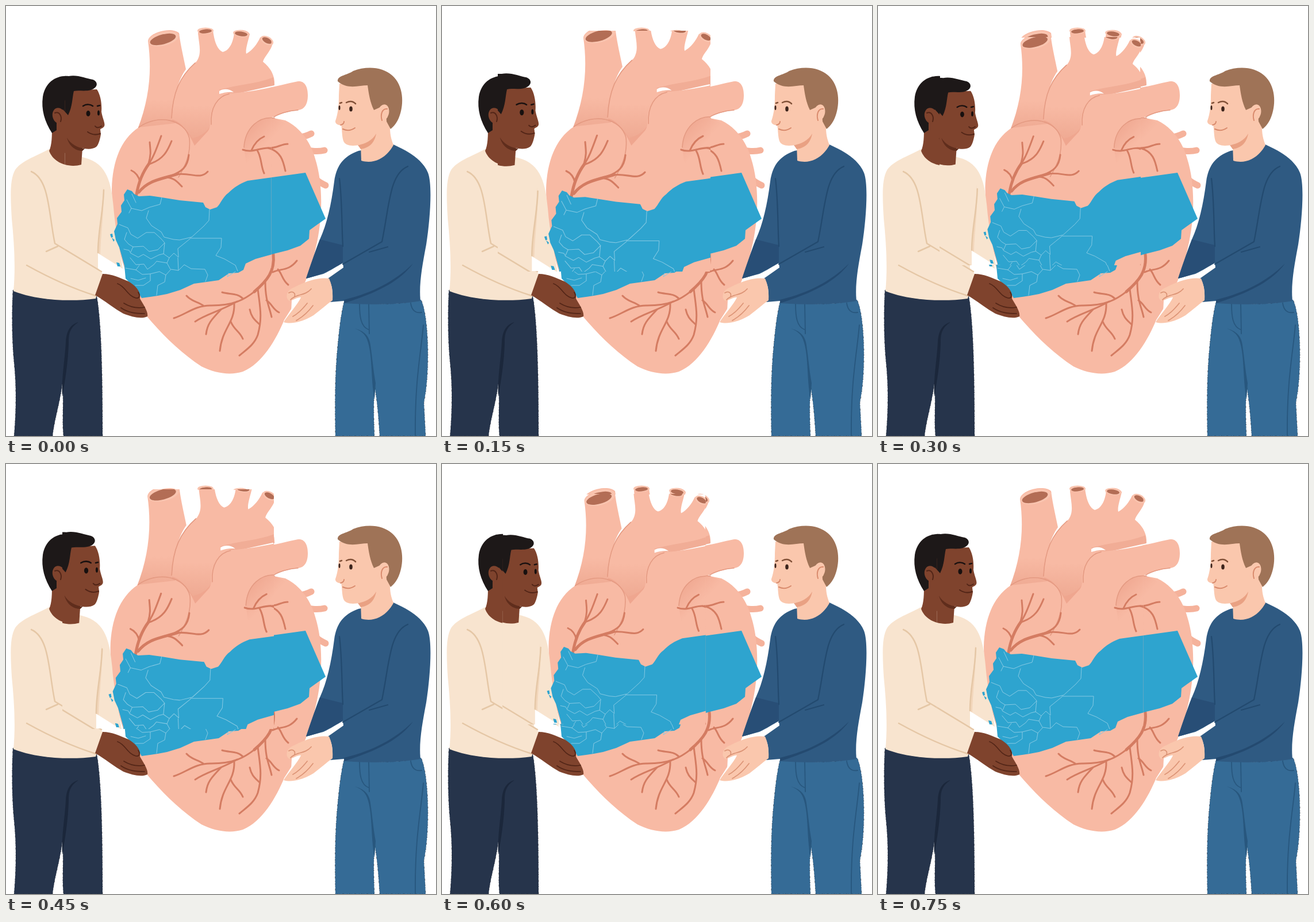
These frames come from a looping animation (748 px wide and 748 px high, 0.9 s). An HTML page:

```html
<!DOCTYPE html>
<html lang="en">
<head>
<meta charset="utf-8">
<title>Beating heart</title>
<style>
html, body { margin: 0; width: 100%; height: 100%; overflow: hidden; background: #fff; }
svg { display: block; width: 100%; height: 100%; }
.line { fill: none; stroke-linecap: round; stroke-linejoin: round; }
.vein { stroke: #d47c62; }
.border { stroke: #86c9e3; stroke-width: 1; }
.fringe { stroke: #1b1b22; stroke-width: 1; stroke-dasharray: 2 3 1 5 3 4 1 2; stroke-opacity: .55; }
</style>
</head>
<body>
<svg viewBox="0 0 748 748">
<defs>
  <clipPath id="win"><rect x="102.500" y="49" width="359" height="407"/></clipPath>
  <linearGradient id="down" x1="0" y1="0" x2="0" y2="1">
    <stop offset=".7" stop-color="#f8baa4"/><stop offset="1" stop-color="#efaa93"/>
  </linearGradient>
  <linearGradient id="lobe" x1="0" y1="0" x2="1" y2="1">
    <stop offset="0" stop-color="#eda28b"/><stop offset=".4" stop-color="#f8baa4"/>
  </linearGradient>
  <linearGradient id="trunk" x1="0" y1="0" x2="1" y2=".25">
    <stop offset="0" stop-color="#eea58e"/><stop offset=".25" stop-color="#f8baa4"/>
  </linearGradient>

  <g id="heart">
    <g class="line" stroke="#f5b29b" stroke-width="11">
      <path d="M496 229C510 230 521 227 531 222"/>
      <path d="M510 246C526 253 543 254 554 251"/>
      <path d="M530 292C540 304 548 308 556 312"/>
    </g>
    <path fill="url(#down)" d="M247 61C254 110 250 160 229 214L296 214C288 170 297 132 313 110C309 90 304 70 301 47C288 35 248 46 247 61Z"/>
    <path fill="#f8baa4" d="M231 211C199 232 185 272 184 318C185 385 200 470 246 541C274 574 305 604 340 627C364 639 390 643 412 636C446 622 470 580 484 546C508 510 530 468 539 420C551 370 552 310 538 266C530 236 511 211 486 199L440 190L330 200Z"/>
    <path fill="#efa68f" d="M289 192L358 158L362 206L328 243C318 220 307 206 289 202Z"/>
    <path fill="url(#down)" d="M288 197C290 150 302 122 331 97C342 82 335 65 334 46C338 38 355 36 360 42C362 60 367 76 377 80C391 77 396 58 397 46C402 40 420 40 424 49C421 62 416 76 418 83C428 78 437 66 442 55C449 50 463 56 464 65C460 80 449 88 447 97C461 108 468 122 467 137L395 153C372 162 357 180 357 206C350 220 336 228 324 230C312 212 302 200 288 197Z"/>
    <path fill="#f1ad96" d="M370 146C405 136 435 136 465 124L467 138L395 154Z"/>
    <path fill="#fff" d="M371 148C378 143 389 144 396 150C388 149 380 150 371 153Z"/>
    <path fill="url(#trunk)" d="M355 208C354 178 362 158 387 152C430 150 470 139 508 131C520 130 525 141 525 155C525 170 520 180 508 181C470 186 430 203 414 247L328 247C341 233 352 222 355 208Z"/>
    <path fill="url(#lobe)" d="M414 247C417 214 436 195 460 194C485 197 510 222 520 250L490 300L420 290Z"/>
    <g class="line" stroke="#e49a82" stroke-width="1.600">
      <path d="M231 211C265 187 311 197 319 230C322 260 310 281 300 298"/>
      <path d="M288 195C290 151 302 123 329 99"/>
      <path d="M357 206C355 177 368 157 388 153"/>
      <path d="M414 246C416 211 441 191 467 195"/>
      <path d="M508 181C490 182 474 188 466 193"/>
    </g>
    <g fill="#f9c4af">
      <ellipse cx="274" cy="57" rx="27" ry="12" transform="rotate(-13 274 57)"/>
      <ellipse cx="347" cy="43" rx="14" ry="5.500"/>
      <ellipse cx="409" cy="48" rx="14" ry="6" transform="rotate(8 409 48)"/>
      <ellipse cx="454" cy="60" rx="12" ry="7" transform="rotate(28 454 60)"/>
    </g>
    <g fill="#b36d55">
      <ellipse cx="273" cy="58" rx="23" ry="8.500" transform="rotate(-15 273 58)"/>
      <ellipse cx="347" cy="44" rx="11" ry="3.600" transform="rotate(-5 347 44)"/>
      <ellipse cx="409" cy="48.500" rx="11" ry="4" transform="rotate(8 409 48.500)"/>
      <ellipse cx="454" cy="60" rx="9" ry="4.500" transform="rotate(28 454 60)"/>
    </g>
    <g class="line vein">
      <g stroke-width="5">
        <path d="M227 328C231 304 240 286 249 274"/>
        <path d="M231 324C248 302 272 301 299 292"/>
        <path d="M465 432C468 461 455 477 432 497"/>
      </g>
      <g stroke-width="3">
        <path d="M245 280C256 265 262 248 270 226"/>
        <path d="M250 237C251 250 253 257 248 274"/>
        <path d="M249 275C274 267 281 252 288 235"/>
        <path d="M218 286C227 290 231 297 233 306"/>
        <path d="M288 295C305 288 316 281 318 259"/>
        <path d="M296 293C322 289 337 303 351 288"/>
        <path d="M277 298C292 298 298 306 306 314"/>
        <path d="M412 250C428 256 440 247 455 247C471 248 478 240 490 240"/>
        <path d="M427 251C432 239 440 231 449 227"/>
        <path d="M456 247C478 253 482 268 486 287"/>
        <path d="M437 251C445 264 443 278 449 291"/>
        <path d="M440 490C415 513 393 521 357 521C330 520 312 537 292 543"/>
        <path d="M343 521C334 514 324 515 314 504"/>
        <path d="M402 514C370 532 350 535 329 549"/>
        <path d="M374 528C357 546 350 553 348 571"/>
        <path d="M397 518C398 552 376 560 372 600"/>
        <path d="M391 549C397 564 406 565 412 579"/>
        <path d="M438 492C441 520 447 540 438 572C432 589 419 597 406 608"/>
        <path d="M440 553C433 546 427 542 424 528"/>
        <path d="M451 479C451 513 458 522 462 541"/>
        <path d="M453 512C463 518 464 528 475 533"/>
        <path d="M412 509C403 499 389 502 376 498"/>
        <path d="M464 463C478 456 491 462 506 443"/>
        <path d="M473 458C481 467 480 476 491 485"/>
      </g>
    </g>
  </g>

  <g id="map">
    <path fill="#2ea4cf" d="M211 319L219 322L223 327L231 331L250 330L271 333L302 338L343 342L347 350L355 354L367 350C374 343 377 332 387 325C397 315 407 309 420 304L456 299L521 290L556 370L539 382L528 390L527 405L512 417L490 425L466 431L434 440L417 448L413 459L404 464L388 465L370 477L349 480L327 483L303 494L280 501L264 504L236 508L226 492L208 474L206 452L201 434L197 420L191 407L188 392L194 379L193 369L201 358L200 347L206 338L205 328Z"/>
    <path fill="#2ea4cf" d="M181 397L185 396L186 402L183 403ZM184 403L189 407L187 410ZM192 446L197 447L199 453L194 453Z"/>
    <g class="line border">
      <path d="M210 337L218 352L236 356L250 350L268 345L271 333M218 352L214 360M219 327L226 342"/>
      <path d="M248 356L244 369L253 382L270 393L275 402L291 406L302 407L323 402L344 383L353 373L354 354"/>
      <path d="M197 380L212 386L217 397L229 404L244 394L258 394L270 405L276 412"/>
      <path d="M217 428L221 419L239 418L249 427L264 424L276 412L274 431L284 438L292 430L300 437L299 422L320 405"/>
      <path d="M320 404L375 404L374 420L365 434L380 440L399 451L403 461"/>
      <path d="M217 430L230 437L239 432L252 440L266 433L274 431M216 438L226 450L240 449L246 458L257 450L262 444L280 447L284 438"/>
      <path d="M208 456L226 459L237 467L251 466L251 478L239 486L225 486M226 459L232 451M251 466L267 462L278 468L276 480L264 486L262 503"/>
      <path d="M278 468L287 458L300 460L299 438M300 460L310 450L322 457L346 458L351 468L347 479M286 458L280 447M217 474L230 477L243 473"/>
      <path d="M205 423L214 425L217 430M210 394L206 406L213 414L221 419M387 465L385 471L399 462"/>
    </g>
  </g>

  <g id="left">
    <path class="fringe" fill="#26344b" d="M12 494C60 514 110 514 158 505C166 550 168 640 168 748H100C97 720 101 690 98 657C94 690 84 720 81 748H14C18 700 18 660 14 620C10 580 10 530 12 494Z"/>
    <path fill="#1b273b" d="M98 680C96 650 103 610 104 585C105 565 112 554 126 550C111 560 109 570 109 586C108 620 103 650 98 680Z"/>
    <path fill="#f8e4cf" d="M75 249C53 261 27 269 16 285C6 302 8 334 10 370C14 410 17 453 13 496C53 512 112 515 156 509L168 466L160 456L160 430L203 457C199 424 190 390 187 350C183 310 177 274 137 264Z"/>
    <path fill="#f2d6bb" d="M169 313C172 350 165 390 164 432L160 430C160 390 169 350 169 313Z"/>
    <g class="line" stroke="#e5c7a6" stroke-width="2.500">
      <path d="M44 288C76 302 74 361 85 413L166 462"/>
      <path d="M70 427L90 418"/>
      <path d="M36 451C72 471 111 490 156 504"/>
      <path d="M170 320C169 360 160 391 160 429"/>
    </g>
    <path fill="#7f432d" d="M111 147L158 145C165 155 167 172 166 184C168 196 173 204 171 209C169 213 164 213 164 215L165 223C164 230 161 242 157 245C150 250 139 249 133 247L131 276C110 282 83 274 75 252C80 242 80 225 80 210Z"/>
    <path fill="#5f2d1c" d="M106 229C112 240 125 247 137 248L133 252C122 252 110 245 106 229Z"/>
    <path fill="#1d1818" d="M80 221C67 201 61 180 64 158C68 133 87 120 109 122C124 119 139 126 151 128C161 132 160 142 148 146C137 149 126 146 118 148C115 160 116 174 108 190L99 180L88 190L88 216Z"/>
    <ellipse cx="92" cy="191" rx="11" ry="14" fill="#7f432d" transform="rotate(-15 92 191)"/>
    <path class="line" stroke="#522517" stroke-width="2" d="M85 186C93 183 98 192 95 201M142 219C149 224 156 225 164 222M155 209C158 213 163 211 166 209"/>
    <path class="line" stroke="#1a1110" stroke-width="2.500" d="M134 174C140 170 147 171 151 174M159 174L163 173"/>
    <g fill="#17100f">
      <ellipse cx="143" cy="187" rx="3.500" ry="5"/>
      <ellipse cx="161" cy="186" rx="2" ry="4.500"/>
    </g>
  </g>

  <g id="leftHand">
    <path fill="#7f432d" d="M168 466C185 466 198 473 213 479C226 487 235 497 233 509C238 518 248 532 246 540C236 545 219 541 204 535C186 525 171 512 155 503Z"/>
    <path class="line" stroke="#522517" stroke-width="1.700" d="M194 483C208 488 211 504 226 508C232 509 234 504 230 498M205 517C218 525 231 526 241 524M200 525C213 534 227 535 241 535"/>
  </g>

  <g id="right">
    <path class="fringe" fill="#356b96" d="M588 514C630 520 690 520 722 511C736 540 738 640 727 690L730 748H650C648 715 646 690 641 660C639 700 640 720 641 748H573C572 690 572 640 577 590C580 560 582 540 588 514Z"/>
    <g class="line" stroke="#28577e" stroke-width="1.800">
      <path d="M615 518C615 540 617 558 631 563M631 518L632 570"/>
      <path d="M704 517C706 530 713 535 723 533M726 555C722 603 711 650 712 748"/>
    </g>
    <path fill="#28577e" d="M607 561C621 565 632 572 634 590C638 618 639 634 643 656L641 685C634 645 638 606 628 580C624 569 616 565 607 561Z"/>
    <path fill="#2f5a82" d="M613 252C586 262 575 278 571 305C566 345 558 380 546 406C536 432 528 455 522 474L552 466C565 460 575 453 586 447L587 455L560 474C569 486 570 503 564 515L588 513V517C635 520 681 520 721 513C718 485 724 452 731 415C738 370 742 310 734 290C724 266 698 252 674 241Z"/>
    <path fill="#284e76" d="M546 406L586 416L586 447C567 457 552 467 522 474C529 455 536 432 546 406Z"/>
    <path fill="#244a70" d="M588 511C634 500 674 481 708 448C681 485 631 503 588 517Z"/>
    <g class="line" stroke="#234a6f" stroke-width="2.200">
      <path d="M699 279C667 292 667 347 654 410L586 449"/>
      <path d="M632 428L664 419M580 300C585 340 584 390 586 418"/>
    </g>
    <path fill="#fac7ad" d="M580 135L630 137L668 180V212C668 227 672 236 674 242C662 264 640 276 618 269L617 241C603 245 590 243 587 235C584 226 585 216 583 207C579 208 572 205 573 200C578 186 579 171 579 155Z"/>
    <path fill="#e9a183" d="M612 242C625 240 637 234 644 222C641 239 631 247 617 249Z"/>
    <path fill="#9f7357" d="M577 131C576 121 592 121 604 113C628 104 655 106 672 121C692 139 692 170 685 190C681 202 676 208 669 214L662 201L660 172L640 181C633 167 631 152 629 138C614 138 594 146 577 131Z"/>
    <ellipse cx="656" cy="186" rx="10" ry="15" fill="#fac7ad" transform="rotate(15 656 186)"/>
    <path class="line" stroke="#d98b6d" stroke-width="2" d="M663 179C654 178 651 189 654 199M586 214C594 218 600 217 607 212M582 207C586 206 588 204 588 201"/>
    <path class="line" stroke="#825138" stroke-width="2.500" d="M592 168C598 165 604 166 608 170M581 169L584 168"/>
    <g fill="#3c241c">
      <ellipse cx="600" cy="179" rx="2.800" ry="4.500"/>
      <ellipse cx="580" cy="177" rx="1.500" ry="4"/>
    </g>
  </g>

  <g id="rightHand">
    <path fill="#fff" d="M497 512L512 505L507 520L496 533Z"/>
    <path fill="#fac7ad" d="M562 474C542 471 518 480 496 492C487 498 486 509 493 513C502 510 508 506 513 507C507 520 490 538 483 550C499 555 520 547 535 538C548 528 558 519 568 512C569 498 567 485 562 474Z"/>
    <path class="line" stroke="#dc9476" stroke-width="1.700" d="M531 492C520 505 505 500 495 511M524 517C516 527 507 536 499 540M534 521C525 533 516 541 505 547M492 499C498 495 504 499 502 505"/>
  </g>

  <g id="art">
    <use href="#heart"/><use href="#left"/><use href="#right"/>
    <use href="#map"/><use href="#leftHand"/><use href="#rightHand"/>
  </g>
</defs>

<use href="#art"/>
<g id="pulse">
  <g clip-path="url(#win)">
    <rect x="103.500" y="50" width="357" height="405" fill="#fff"/>
    <use href="#art"/>
  </g>
</g>
</svg>
<script>
const pulse = document.getElementById('pulse');
const scales = [1, 1.03, 0.975, 1.025, 0.985, 1];
const hold = 150, cx = 282, cy = 252;

// Each beat jumps straight to its scale around the middle of the window.
function draw(ms) {
  const s = scales[Math.floor(ms / hold) % scales.length];
  pulse.setAttribute('transform', `translate(${cx} ${cy}) scale(${s}) translate(${-cx} ${-cy})`);
}

const start = performance.now();
function tick() {
  draw(performance.now() - start);
  requestAnimationFrame(tick);
}
draw(0);
requestAnimationFrame(tick);
</script>
</body>
</html>
```
